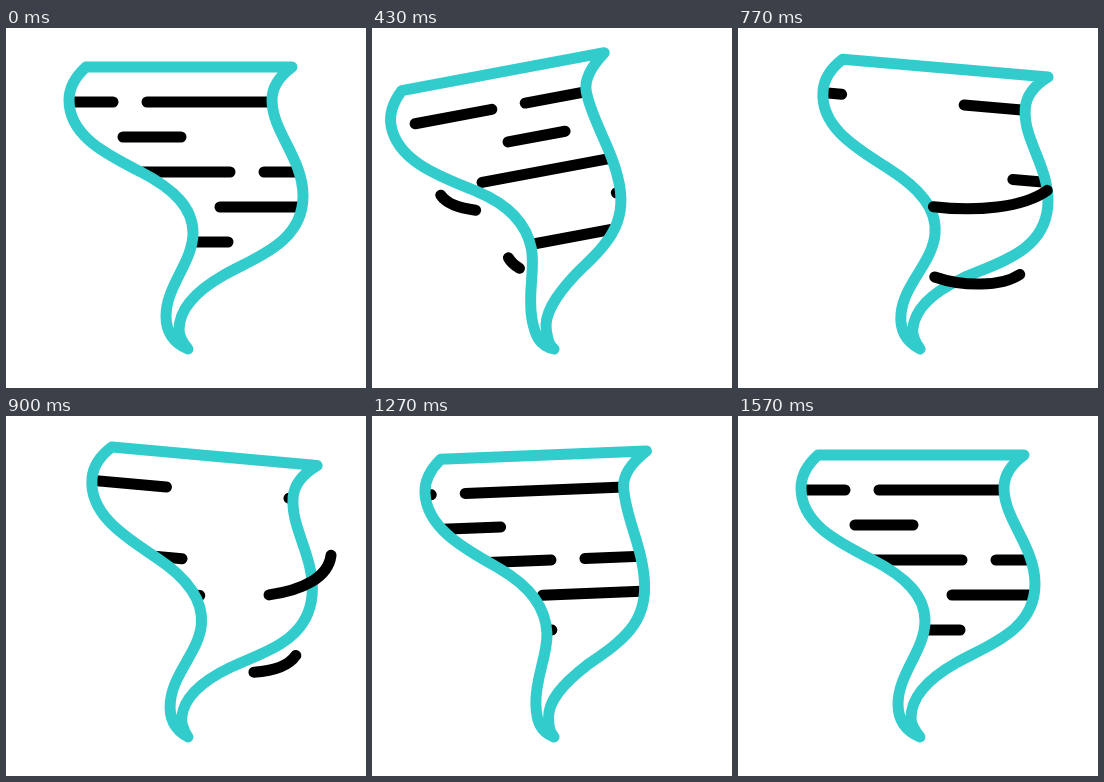
Animation, 360 px wide and 360 px high, one loop 1.67 s. Source, as an HTML page:

```html
<!DOCTYPE html>
<html>
<head>
<meta charset="utf-8">
<style>
  html, body { margin: 0; height: 100%; overflow: hidden; background: #fff; }
  svg { display: block; width: 100vw; height: 100vh; }
  path { fill: none; stroke: #000; stroke-width: 11; stroke-linecap: round; stroke-linejoin: round; }
  #funnel { stroke: #3cc; }
</style>
</head>
<body>
<svg viewBox="0 0 360 360">
  <clipPath id="inside"><path id="mask"/></clipPath>
  <g id="swing">
    <g clip-path="url(#inside)"><path id="rows"/></g>
    <path id="funnel"/>
    <path id="gustA" pathLength="1" d="M99 149C118 192 306 190 308 127"/>
    <path id="gustB" pathLength="1" d="M154 223C166 258 264 262 282 230"/>
  </g>
</svg>
<script>
const LOOP = 1670, LAST = 47, PERIOD = 400;
const $ = id => document.getElementById(id);
const clamp = x => Math.min(1, Math.max(0, x));
const smooth = (t, from, to) => {
  const u = clamp((t - from) / (to - from));
  return u * u * (3 - 2 * u);
};

// Dashes as [y, start, end]; each repeats every PERIOD
const dashes = [
  [74, 29, 107], [74, 141, 306], [109, 117, 175], [144, 84, 224],
  [144, 258, 328], [179, 214, 349], [214, 115, 222]
];
$('rows').setAttribute('d', dashes.map(([y, a, b]) =>
  `M${a} ${y}H${b}M${a - PERIOD} ${y}H${b - PERIOD}`).join(''));

// Swing angle keys as [ms, degrees]
const swingKeys = [[0, 0], [390, -11], [845, 6.2], [1105, -3.2], [1567, 0]];
function swingAngle(t) {
  const i = Math.max(1, swingKeys.findIndex(k => k[0] >= t));
  const [t0, a0] = swingKeys[i - 1], [t1, a1] = swingKeys[i];
  return a0 + (a1 - a0) * (1 - Math.cos(Math.PI * (t - t0) / (t1 - t0))) / 2;
}

// cubic-bezier(.43, 0, .64, 1), solved by bisection
function flow(p) {
  let lo = 0, hi = 1, v;
  for (let i = 0; i < 20; i++) {
    v = (lo + hi) / 2;
    const w = 1 - v;
    if (1.29 * v * w * w + 1.92 * v * v * w + v * v * v < p) lo = v; else hi = v;
  }
  return p <= 0 ? 0 : p >= 1 ? 1 : v * v * (3 - 2 * v);
}

// Funnel outline; m draws in the right bulge and straightens the tail
function funnel(m) {
  const right = 297 - 21 * m, neck = 266 - 5 * m, waist = 187 - 9 * m;
  const tail = 160 + 6 * m, inner = 173 + 5 * m;
  return `M80 39C69 49 63 60 63 72C63 110 ${105 + 3 * m} ${128 + 6 * m} 135 ${144 + 8 * m}
    C${168 - 4 * m} ${161 + 10 * m} ${waist} ${180 + 13 * m} ${waist} ${205 + 14 * m}
    C${waist} ${234 + 6 * m} ${tail} ${258 + 4 * m} ${tail} 288
    C${tail} 304 168 315 182 321C177 315 ${inner} 309 ${inner} 302
    C${inner} ${282 + 4 * m} ${188 + 4 * m} ${264 + 6 * m} 218 ${247 + 4 * m}
    C${252 - 2 * m} ${228 + 2 * m} ${right} 214 ${right} ${168 + 4 * m}
    C${right} ${130 + 5 * m} ${neck} 104 ${neck} ${72 + 2 * m}
    C${neck} ${58 + 2 * m} 275 47 286 39Z`;
}

function trim(id, tail, head) {
  const style = $(id).style;
  style.display = head > tail && tail < 1 ? '' : 'none';
  style.strokeDasharray = `${head - tail} 2`;
  style.strokeDashoffset = -tail;
}

function draw(now) {
  // 30 steps per second, then a short rest
  const step = Math.min(LAST, Math.floor((now % LOOP + 3.4) * 0.03));
  const p = step / LAST, t = p * 1567;
  $('swing').setAttribute('transform', `rotate(${swingAngle(t)} 182 321)`);
  $('rows').setAttribute('transform', `translate(${PERIOD * flow(p)} 0)`);
  const d = funnel(Math.sin(2 * Math.PI * p) ** 2);
  $('funnel').setAttribute('d', d);
  $('mask').setAttribute('d', d);
  trim('gustA', smooth(t, 470, 1170), smooth(t, 270, 905));
  trim('gustB', smooth(t, 561, 1108), smooth(t, 326, 856));
}

const start = performance.now();
function tick() {
  draw(performance.now() - start);
  requestAnimationFrame(tick);
}
tick();
</script>
</body>
</html>
```
